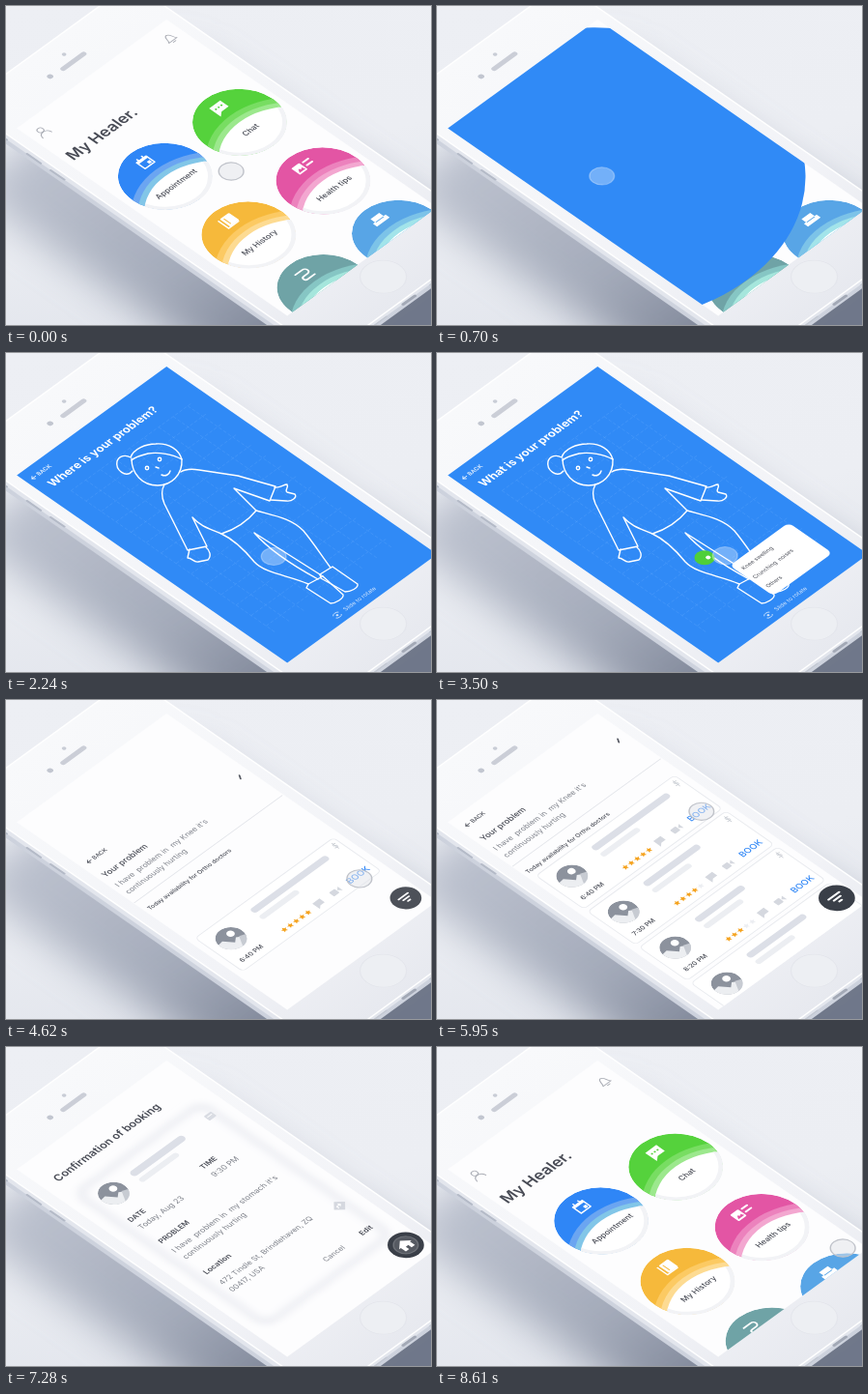
An HTML page that plays this animation: 440x330 px, repeating every 8.68 s.

```html
<!DOCTYPE html>
<html lang="en">
<head>
<meta charset="utf-8">
<title>Clinic app on a phone</title>
<style>
  html, body { margin: 0; width: 100%; height: 100%; overflow: hidden; background: #eceef3; }
  svg { display: block; width: 440px; height: 330px; }
  text { font-family: Inter, "Open Sans", sans-serif; fill: #484b55; white-space: pre; }
  .soft { fill: #7d8089; }
  .white { fill: #fff; }
  .mid { text-anchor: middle; }
  .b { font-weight: 600; }
  .m { font-weight: 500; }
  .x { font-weight: 700; }
  .link { fill: #2f86f6; }
  .line { fill: none; stroke: #fff; stroke-width: 1.4; stroke-linecap: round; stroke-linejoin: round; }
</style>
</head>
<body>
<svg id="stage" viewBox="0 0 440 330"></svg>
<script>
const LOOP = 8680;
const PLANE = 'matrix(.408 -.296 .4198 .2909 12 126)'; // 375 x 667 screen laid on the phone
const $ = id => document.getElementById(id);

// ---- drawing helpers
const text = (x, y, size, str, cls = '') => `<text x="${x}" y="${y}" font-size="${size}" class="${cls}">${str}</text>`;
const bar = (x, y, w, h, fill, r = h / 2) => `<rect x="${x}" y="${y}" width="${w}" height="${h}" rx="${r}" fill="${fill}"/>`;
const path = (d, stroke, w = 2) => `<path d="${d}" fill="none" stroke="${stroke}" stroke-width="${w}" stroke-linecap="round" stroke-linejoin="round"/>`;
const group = (id, body, extra = '') => `<g id="${id}" ${extra}>${body}</g>`;
const move = (x, y, body) => `<g transform="translate(${x} ${y})">${body}</g>`;
const back = (x, y, color, cls) => path(`M${x + 9} ${y - 4}h-9m4 -4l-4 4 4 4`, color, 1.6) + text(x + 14, y, 12, 'BACK', 'm ' + cls);

function star(x, y, fill) {
  const pts = [...Array(10).keys()].map(i => {
    const a = i * Math.PI / 5, r = i % 2 ? 3 : 6.5;
    return `${(x + r * Math.sin(a)).toFixed(1)},${(y - r * Math.cos(a)).toFixed(1)}`;
  });
  return `<polygon points="${pts.join(' ')}" fill="${fill}"/>`;
}

const avatar = (x, y) => move(x, y, `<g clip-path="url(#face)"><circle r="28" fill="#8c929d"/>
  <circle cx="8" cy="-9" r="7.5" fill="#fff"/><path d="M-30 30V-4L-16 -6 -2 12 8 4 32 20V30Z" fill="#eceef1"/>
  <path d="M0 30L14 6 34 14V30Z" fill="#c7cbd2"/></g>`);

// ---- home
const icons = {
  cal: path('M-12 -9h24v21h-24zM-6 -14v5M6 -14v5', '#fff', 3) + bar(-12, -10, 24, 6, '#fff', 0) + bar(2, 2, 7, 7, '#fff', 1),
  chat: '<path d="M-14 -12h28v21h-18l-10 8z" fill="#fff"/>' + [-7, 0, 7].map(x => `<circle cx="${x}" cy="-2" r="2" fill="#55d23c"/>`).join(''),
  tips: bar(-19, -11, 20, 22, '#fff', 2) + '<path d="M-16 7l5 -8 4 4 3 -3 3 7z" fill="#e355a4"/>' + path('M7 -7h13M7 3h13', '#fff', 4),
  book: bar(-9, -13, 23, 26, '#fff', 2) + path('M-14 -11v25h25', '#fff', 3) + path('M-3 -8v16', '#f6b93b', 2),
  hook: path('M-14 -8h18a6 6 0 0 1 0 13h-10a5 5 0 0 0 0 10h18', '#fff', 3.5),
  sofa: '<path d="M-11 -10h22v11h5v10h-32v-10h5z" fill="#fff"/>' + path('M-9 2h18', '#58a5e6', 2)
};

const disc = (x, y, label, icon, [main, band, pale]) => {
  const hump = (r, fill) => `<circle cy="130" r="${r}" fill="${fill}"/>`;
  return move(x, y, `<g clip-path="url(#disc)"><circle r="83" fill="${main}"/>${hump(153, band)}${hump(141, pale)}</g>
    <circle r="80" fill="#fff" stroke="#f2f3f6" stroke-width="8" clip-path="url(#hump)"/>`
    + move(1, -50, icons[icon]) + text(0, 33, 16, label, 'mid m'));
};

const home = group('home',
  group('top', `<circle cx="24" cy="33" r="6" fill="none" stroke="#a9acb4" stroke-width="2"/>` + path('M13 50c2 -14 20 -14 22 0', '#a9acb4')
    + path('M339 44c5 -4 2 -16 10 -17 8 1 5 13 10 17zM346 48h6', '#a9acb4') + text(10, 128, 32, 'My Healer.', 'b'))
  + group('row0', disc(96, 270, 'Appointment', 'cal', ['#2f86f6', '#6ba5f1', '#82c6e8']) + disc(285, 270, 'Chat', 'chat', ['#55d23c', '#78dd62', '#9ce88d']))
  + group('row1', disc(95, 477, 'My History', 'book', ['#f6b93b', '#fcca63', '#fddb92']) + disc(284, 477, 'Health tips', 'tips', ['#e355a4', '#ec82bd', '#f3a7d0']))
  + group('row2', disc(94, 664, 'Reports', 'hook', ['#6fa3a6', '#86c6c4', '#a5e6dc']) + disc(284, 664, 'Lounge', 'sofa', ['#58a5e6', '#7cc3e8', '#a2e4ea'])));

// ---- body picker
let grid = '';
for (let x = 38; x < 350; x += 37) grid += `M${x} 95V600`;
for (let y = 95; y < 610; y += 37) grid += `M38 ${y}H345`;

const blue = '<circle id="wave" cx="96" cy="270" fill="#308af6"/>' + group('scan',
  `<path d="${grid}" stroke="#7db8ff" stroke-width="1.2" stroke-dasharray="7 4" fill="none" opacity=".3"/>`
  + back(11, 29, '#fff', 'white')
  + group('where', text(22, 66, 23.2, 'Where is your problem?', 'x white'))
  + group('what', text(22, 66, 23.2, 'What is your problem?', 'x white'))
  + `<g opacity=".8">${text(163, 651, 12, 'Slide to rotate', 'white')}
     ${path('M139 643a7 4 0 0 1 13 0M152 651a7 4 0 0 1 -13 0', '#fff', 1.6)}<circle cx="145.5" cy="647" r="2.5" fill="#fff"/></g>`);

const figure = group('figure', `
  <path d="M131 122C124 130 113 121 115 112C117 106 124 105 129 108C132 99 145 94 155 94C169 93 179 100 182 110C173 105 158 102 147 104C139 106 133 108 130 111"/>
  <path d="M130 109C130 125 141 137 157 137C171 137 183 126 182 110"/>
  <circle cx="146" cy="119" r="1.7"/><circle cx="159" cy="110" r="1.7"/><path d="M155 118l3 1M161 126c4 2 8 0 9 -4"/>
  <path d="M164 136C160 143 161 149 164 156L188 204L208 200L193 170C202 180 212 182 223 187"/>
  <path d="M181 123C187 119 194 120 200 121L240 127L279 138L273 153L236 140L259 163"/>
  <path d="M190 203L188 212C193 212 194 217 199 216L209 214C213 210 211 204 207 201"/>
  <path d="M278 139C284 140 287 136 291 136C293 139 288 142 291 144L299 146C302 149 296 154 290 153L274 152"/>
  <path d="M223 187Q245 180 259 163M223 187C238 194 248 205 257 216C268 228 292 230 313 239"/>
  <path d="M259 163C277 168 296 171 308 184C318 196 327 210 336 222"/>
  <path d="M257 186L328 231M257 186C270 201 290 216 323 234"/>
  <path d="M313 239L328 231L349 250C350 254 341 259 336 259L311 243Z"/>
  <path d="M325 229L338 221L364 239C365 243 357 247 351 247L326 233Z"/>`, 'class="line"');

const picker = group('knee', '<circle r="18" fill="#4fcf3a"/><circle cx="5" cy="4" r="4.5" fill="#fff"/>')
  + '<rect id="sheet" fill="#fff"/>'
  + group('choices', text(196, 538, 11.5, 'Knee swelling') + text(194, 568, 11.5, 'Crunching  noises') + text(194, 600, 11.5, 'Others'));

// ---- doctors list
const cards = [['6:40 PM', 192, 5], ['7:30 PM', 138, 4], ['8:20 PM', 120, 3], ['9:10 PM', 145, 4]];
const card = ([time, w, rate], i) => group('card' + i, move(0, 250 + i * 127.3,
  `<rect x="12" y="-46" width="351" height="118" rx="9" fill="#fff" stroke="#e9ebef" stroke-width="2"/>` + avatar(56, 0)
  + bar(130, -27, w, 14, '#dcdfe7') + bar(129, -4, 95, 12, '#eceef2') + text(27, 56, 13.5, time, 'm')
  + [0, 1, 2, 3, 4].map(n => star(138 + n * 15, 52, n < rate ? '#f5a31f' : '#eceef2')).join('')
  + '<path d="M219 42h18v13h-11l-7 6z" fill="#d5d8df"/>' + bar(259, 44, 14, 13, '#d5d8df', 2) + '<path d="M274 50l7 -6v13z" fill="#d5d8df"/>'
  + text(301, 56, 18, 'BOOK', 'm link') + path('M355 -34c-7 -4 -9 3 -4 4s4 8 -4 4M351 -38v17', '#c3c7cf', 1.5)));

const list = group('list',
  group('head', back(14, 33, '#484b55', '') + text(9, 78, 17, 'Your problem', 'm')
    + text(8, 111, 15.5, "I have  problem in  my Knee it's", 'soft') + text(8, 136, 15.5, 'continuously hurting', 'soft')
    + path('M353 77l5 -8', '#555862', 3) + path('M0 158H375', '#e4e6eb', 2)
    + text(6, 191, 12.4, 'Today availability for Ortho doctors', 'm'))
  + cards.map(card).join(''));

// ---- confirmation
const confirm = group('confirm',
  group('ctitle', text(27, 73, 22.3, 'Confirmation of booking', 'b'))
  + group('ticket', `<rect x="20" y="106" width="334" height="486" rx="30" fill="#f0f1f5" filter="url(#haze)"/>`
    + `<rect x="38" y="124" width="298" height="450" rx="20" fill="#fdfdfe" filter="url(#haze)"/>` + avatar(75, 162)
    + bar(130, 145, 134, 15, '#dcdfe7') + bar(130, 168, 96, 12, '#eceef2') + bar(324, 142, 18, 15, '#d9dce3', 2) + path('M328 148h10', '#fff', 2))
  + group('when', text(45, 234, 15, 'DATE', 'b') + text(45, 260, 16, 'Today, Aug 23', 'soft')
    + text(229, 233, 15, 'TIME', 'b') + text(229, 261, 16, '9:30 PM', 'soft'))
  + group('why', text(45, 309, 15, 'PROBLEM', 'b') + text(45, 342, 16, "I have  problem in  my stomach it's", 'soft')
    + text(47, 367, 16, 'continuously hurting', 'soft'))
  + group('place', text(45, 419, 15.5, 'Location', 'b') + text(46, 457, 15.5, '472 Tindle St, Brindlehaven, ZQ', 'soft')
    + text(46, 482, 15.5, '00417, USA', 'soft') + '<path d="M333 453l14 14 -14 14 -14 -14z" fill="#d5d8df"/>' + path('M328 470v-5h9m-3 -3l3 3 -3 3', '#fff', 2)
    + text(216, 548, 15, 'Cancel', 'soft') + text(308, 548, 15, 'Edit', 'b')));

const fab = group('fab', '<circle r="31" fill="#3a3f48"/>'
  + group('filter', path('M-13 -7h26M-8 1h16M-3 9h6', '#fff', 4))
  + group('house', '<path d="M0 -14l15 13h-4v12h-8v-8h-6v8h-8v-12h-4z" fill="#fff"/>'));

// ---- phone
const shell = fill => `<rect x="-25" y="-108" width="425" height="893" rx="62" fill="${fill}"/>`;
const glass = '<rect x="-2" width="380" height="667" fill="#fdfdfe"/>';
const phone = `
  <g transform="${PLANE}"><rect x="-175" y="40" width="530" height="920" rx="70" fill="url(#shade)" filter="url(#blur)"/></g>
  <g transform="translate(-1 10)"><g transform="${PLANE}">${shell('#cdd2dd')}</g></g>
  <g transform="translate(-1 5)"><g transform="${PLANE}">${shell('#e3e6ed')}
    ${path('M-25 50v34M-25 108v34M-25 -18v18', '#b4bac7', 4)}${path('M172 786h30', '#a3a9b6', 6)}${path('M70 786h60M240 786h60', '#c3c8d2', 3)}</g></g>
  <g transform="${PLANE}">${shell('url(#front)')}
    <rect x="-25" y="-108" width="425" height="893" rx="62" fill="none" stroke="#fff" stroke-width="3"/>
    <circle cx="132" cy="-48" r="5.5" fill="#c2c6d0"/><circle cx="189" cy="-69" r="4" fill="#c9cdd6"/>
    ${bar(157, -50, 62, 10, '#cbced7')}
    <circle cx="187" cy="720" r="41" fill="#edeff3" stroke="#e4e6ec" stroke-width="2"/>${glass}</g>`;

const layer = body => `<g transform="${PLANE}" clip-path="url(#screen)">${body}</g>`;
$('stage').innerHTML = `
  <defs>
    <linearGradient id="sky" x2=".3" y2="1"><stop stop-color="#edeff4"/><stop offset=".6" stop-color="#eceef3"/><stop offset="1" stop-color="#e3e6ed"/></linearGradient>
    <linearGradient id="front" x2="0" y2="1"><stop stop-color="#f8f9fb"/><stop offset=".7" stop-color="#f2f3f7"/><stop offset="1" stop-color="#e7e9ef"/></linearGradient>
    <linearGradient id="shade" x2="0" y2="1"><stop stop-color="#9ea6b8" stop-opacity=".6"/><stop offset=".45" stop-color="#8f97a9" stop-opacity=".75"/><stop offset=".8" stop-color="#697184" stop-opacity=".95"/></linearGradient>
    <filter id="blur" x="-60%" y="-30%" width="220%" height="160%"><feGaussianBlur stdDeviation="42"/></filter>
    <filter id="haze"><feGaussianBlur stdDeviation="7"/></filter>
    <clipPath id="screen">${glass}</clipPath>
    <clipPath id="disc"><circle r="83"/></clipPath>
    <clipPath id="hump"><circle cy="130" r="130"/></clipPath>
    <clipPath id="face"><circle r="28"/></clipPath>
  </defs>
  <rect width="440" height="330" fill="url(#sky)"/>${phone}
  ${layer(home + blue)}${figure}
  ${layer(picker + list + confirm + fab)}
  <g transform="${PLANE}"><circle id="touch" stroke-width="2.5"/></g>`;

// ---- motion
const clamp = k => Math.max(0, Math.min(1, k));
const ease = k => k * k * (3 - 2 * k);
const mix = (a, b, k) => a + (b - a) * k;
const ramp = (t, a, b) => ease(clamp((t - a) / (b - a)));
const shift = (id, y) => $(id).setAttribute('transform', `translate(0 ${y.toFixed(2)})`);
const show = (id, o) => {
  $(id).setAttribute('opacity', o);
  $(id).style.display = o > 0 ? '' : 'none';
};

// keys: [time, value...] with eased steps between
function track(t, keys) {
  const i = keys.findIndex(k => k[0] > t);
  if (i < 0) return keys[keys.length - 1].slice(1);
  if (i === 0) return keys[0].slice(1);
  const a = keys[i - 1], b = keys[i], k = ramp(t, a[0], b[0]);
  return a.slice(1).map((v, n) => mix(v, b[n + 1], k));
}

const touchPath = [[0, 187, 345], [90, 187, 345], [400, 96, 270], [560, 96, 270], [1080, 139, 310], [1450, 139, 310],
  [2300, 172, 467], [3300, 172, 467], [3740, 232, 518], [3850, 232, 518], [4480, 322, 530], [4640, 322, 530],
  [5350, 332, 301], [6150, 332, 301], [7150, 345, 622], [7910, 345, 622], [8300, 347, 635]];
const taps = [470, 1300, 2430, 3770, 6050, 7880];

function drawHome(t) {
  const s = t > 8000 ? (LOOP - t) / 630 : 0;
  show('home', t < 900 || t > 8050 ? 1 : 0);
  [['top', 650], ['row0', 1050], ['row1', 1620], ['row2', 3600]].forEach(([id, d]) => shift(id, d * s * s));
}

function drawPicker(t) {
  const on = t < 4100;
  show('wave', on && t > 480 ? 1 : 0);
  $('wave').setAttribute('r', mix(60, 560, ramp(t, 480, 860)));
  const seen = on ? ramp(t, 740, 1120) : 0;
  show('scan', seen);
  show('figure', seen * (1 - ramp(t, 3720, 3900)));
  const swap = ramp(t, 2450, 2680);
  show('where', 1 - swap);
  show('what', swap);
  $('knee').setAttribute('transform', `translate(169 467) scale(${ramp(t, 2430, 2700)})`);
  show('knee', on && t > 2430 ? 1 : 0);

  const open = ramp(t, 2800, 3150), fill = ramp(t, 3760, 4050);
  const box = { x: mix(186, -2, fill), y: mix(512, 0, fill), width: mix(150 * open, 380, fill), height: mix(108 * open, 667, fill), rx: mix(11, 0, fill) };
  for (const k in box) $('sheet').setAttribute(k, box[k]);
  show('sheet', on && t > 2800 ? 1 : 0);
  show('choices', ramp(t, 3060, 3250) * (1 - ramp(t, 3740, 3860)));
}

function drawList(t) {
  const out = ramp(t, 6090, 6400);
  show('list', t > 3950 ? 1 - out : 0);
  shift('list', -50 * out);
  const slide = (id, near, far) => shift(id, track(t, [[3950, far], [4540, near], [4640, near], [5350, 0]])[0]);
  slide('head', 130, 660);
  cards.forEach((c, i) => slide('card' + i, 222 + 140 * i, 700 + 160 * i));
}

function drawConfirm(t) {
  const out = ramp(t, 7910, 8190), s = clamp((7560 - t) / 1260);
  show('confirm', t > 6300 ? 1 - out : 0);
  shift('confirm', -40 * out);
  ['ctitle', 'ticket', 'when', 'why', 'place'].forEach((id, i) => shift(id, (600 + 200 * i) * s ** 4));
}

function drawFab(t) {
  const size = ramp(t, 4250, 4500) * mix(.9, 1.04, ramp(t, 4700, 5300)) * (1 - ramp(t, 7930, 8120));
  $('fab').setAttribute('transform', `translate(345 622) scale(${size})`);
  show('fab', size);
  const swap = ramp(t, 6300, 6600);
  show('filter', 1 - swap);
  show('house', swap);
}

function drawTouch(t) {
  const [x, y] = track(t, touchPath), dot = $('touch');
  const press = Math.max(...taps.map(p => clamp(1 - Math.abs(t - p) / 110)));
  const onBlue = t > 640 && t < 3800, onDark = t > 7000 && t < 8000;
  dot.setAttribute('cx', x);
  dot.setAttribute('cy', y);
  dot.setAttribute('r', 22 - 4 * ease(press));
  dot.setAttribute('fill', onBlue ? 'rgba(255,255,255,.32)' : onDark ? 'rgba(255,255,255,.14)' : 'rgba(226,228,234,.5)');
  dot.setAttribute('stroke', onBlue ? 'rgba(255,255,255,.3)' : onDark ? 'rgba(255,255,255,.2)' : '#c0c3ca');
}

const start = performance.now();
function frame(now) {
  const t = Math.max(0, now - start) % LOOP;
  [drawHome, drawPicker, drawList, drawConfirm, drawFab, drawTouch].forEach(draw => draw(t));
  requestAnimationFrame(frame);
}
frame(start);
</script>
</body>
</html>
```
